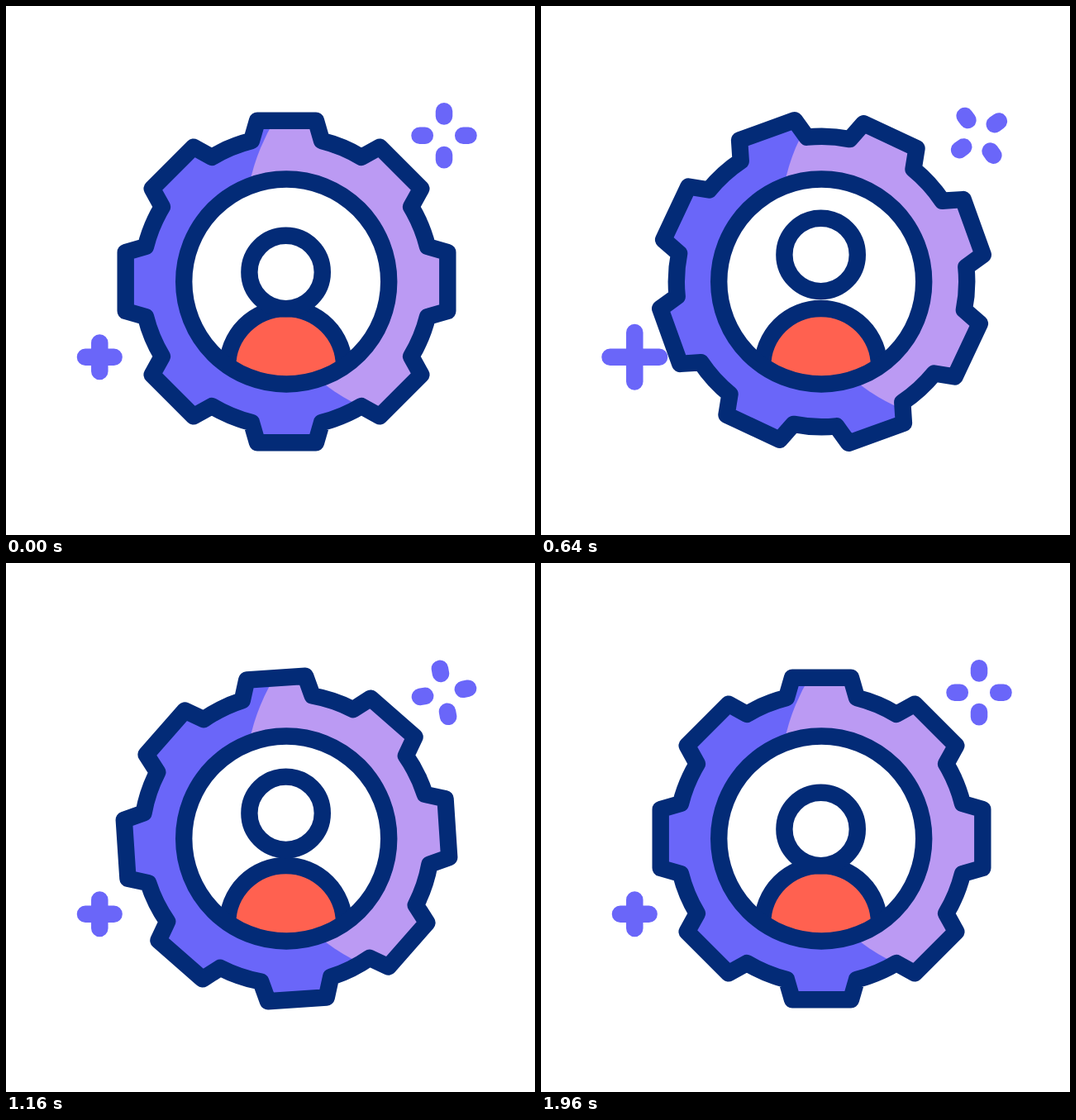
Recreate the animation shown at these times as an HTML page. Size 640 by 640 pixels, loop 2000 ms.

```html
<!DOCTYPE html>
<html lang="en">
<head>
<meta charset="utf-8">
<title>Profile settings</title>
<style>
  html, body { margin: 0; width: 100%; height: 100%; overflow: hidden; background: #fff; }
  svg { display: block; width: 100vw; height: 100vh; }
  .line { fill: none; stroke: #032b77; stroke-width: 20.4; stroke-linejoin: round; }
  .spark { fill: none; stroke: #6a66f9; stroke-width: 20.5; stroke-linecap: round; }
</style>
</head>
<body>
<svg viewBox="0 0 640 640">
  <defs>
    <clipPath id="gearClip"><path class="gear"/></clipPath>
  </defs>
  <g clip-path="url(#gearClip)">
    <rect width="640" height="640" fill="#6a66f9"/>
    <circle cx="532" cy="264.5" r="242.5" fill="#bb9af3"/>
  </g>
  <path class="gear line"/>
  <circle cx="339.2" cy="333.5" r="124" fill="#fff"/>
  <clipPath id="ringClip"><circle cx="339.2" cy="333.5" r="124"/></clipPath>
  <g clip-path="url(#ringClip)">
    <circle class="line" cx="338.6" cy="436.5" r="70.5" style="fill:#ff6150"/>
  </g>
  <circle id="head" class="line" cx="338.6" cy="322" r="44.2" style="fill:#fff"/>
  <circle class="line" cx="339.2" cy="333.5" r="124"/>
  <path id="burst" class="spark" d="M0-29.5V-23.2M0 29.5V23.2M-29.5 0H-23.2M29.5 0H23.2"/>
  <path id="plus" class="spark"/>
</svg>
<script>
const LOOP = 2000, TURN = 1960, TEETH = 8;
const $ = id => document.getElementById(id);
const gears = document.querySelectorAll('.gear');
const head = $('head'), burst = $('burst'), plus = $('plus');

const progress = (t, from, to) => Math.min(1, Math.max(0, (t - from) / (to - from)));
const cubic = u => u < .5 ? 4 * u ** 3 : 1 - 4 * (1 - u) ** 3;
const sine = u => (1 - Math.cos(Math.PI * u)) / 2;

// Symmetric cubic-bezier(a, 0, 1 - a, 1), solved by bisection
function bezier(u, a) {
  let lo = 0, hi = 1, s;
  for (let i = 0; i < 24; i++) {
    s = (lo + hi) / 2;
    const x = 3 * (1 - s) ** 2 * s * a + 3 * (1 - s) * s * s * (1 - a) + s ** 3;
    if (x < u) lo = s; else hi = s;
  }
  return s * s * (3 - 2 * s);
}

// Each tooth is a trapezoid; arcs join neighbouring roots
function gearPath() {
  const tooth = [[-42.5, -170.5], [-35.5, -194.8], [35.5, -194.8], [42.5, -170.5]];
  const rootRadius = 175.8;
  let d = '';
  for (let i = 0; i < TEETH; i++) {
    const a = i * 2 * Math.PI / TEETH, c = Math.cos(a), s = Math.sin(a);
    tooth.forEach(([x, y], k) => {
      const cmd = k ? 'L' : i ? `A${rootRadius} ${rootRadius} 0 0 1 ` : 'M';
      d += `${cmd}${(x * c - y * s).toFixed(2)} ${(x * s + y * c).toFixed(2)}`;
    });
  }
  return `${d}A${rootRadius} ${rootRadius} 0 0 1 ${tooth[0].join(' ')}Z`;
}

function draw(t) {
  const u = progress(t, 0, TURN);
  const gearAngle = 180 * cubic(u);
  for (const g of gears) g.setAttribute('transform', `translate(339.5 333.5) rotate(${gearAngle})`);
  burst.setAttribute('transform', `translate(530 156.8) rotate(${360 * bezier(u, .625)})`);

  const lift = cubic(progress(t, 75, 915)) - cubic(progress(t, 875, 1630));
  head.setAttribute('cy', 322 - 24.5 * lift);

  const grow = sine(progress(t, 0, 600)) - sine(progress(t, 600, 1000));
  const arm = 17.3 + 12.8 * grow;
  plus.setAttribute('d', `M${113.3 - arm} 424.8h${2 * arm}M113.3 ${424.8 - arm}v${2 * arm}`);
}

const outline = gearPath();
for (const g of gears) g.setAttribute('d', outline);

function tick() {
  draw(performance.now() % LOOP);
  requestAnimationFrame(tick);
}
tick();
</script>
</body>
</html>
```
